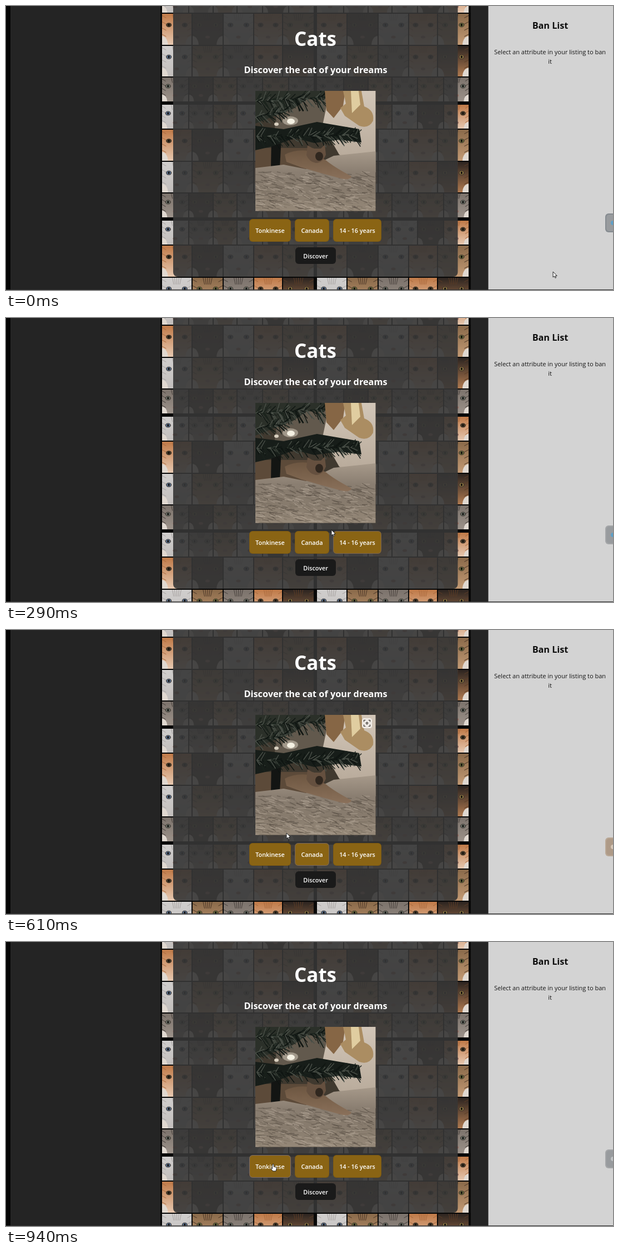
These frames come from a looping animation (1093x512 px, 1010 ms). An HTML page with a canvas:

```html
<!DOCTYPE html>
<html lang="en">
<head>
<meta charset="utf-8">
<title>Cats</title>
<style>
  html, body { margin: 0; width: 100%; height: 100%; overflow: hidden; background: #242424; }
  canvas { display: block; }
</style>
</head>
<body>
<canvas id="stage" width="1093" height="512"></canvas>
<script>
const W = 1093, H = 512, LOOP = 1010;
const stage = document.getElementById('stage').getContext('2d');
const scene = Object.assign(document.createElement('canvas'), { width: W, height: H });
let g = scene.getContext('2d');

let seed = 7;
const random = () => (seed = (seed * 16807) % 2147483647) / 2147483647;

function rect(x, y, w, h, color, radius = 0) {
  g.fillStyle = color;
  g.beginPath();
  g.roundRect(x, y, w, h, radius);
  g.fill();
}
function ellipse(x, y, rx, ry, color) {
  g.fillStyle = color;
  g.beginPath();
  g.ellipse(x, y, rx, ry, 0, 0, 7);
  g.fill();
}
function shape(path, color, outline) {
  const p = new Path2D(path);
  g.fillStyle = color;
  g.fill(p);
  if (outline) { g.strokeStyle = outline; g.lineWidth = 1; g.stroke(p); }
}
function line(x1, y1, x2, y2, color, width = 1) {
  g.strokeStyle = color;
  g.lineWidth = width;
  g.beginPath();
  g.moveTo(x1, y1);
  g.lineTo(x2, y2);
  g.stroke();
}
function text(str, x, y, size, weight, color) {
  g.font = `${weight} ${size}px "Open Sans", "Noto Sans", sans-serif`;
  g.textAlign = 'center';
  g.fillStyle = color;
  g.fillText(str, x, y);
}
function gradient(y1, y2, ...colors) {
  const fill = g.createLinearGradient(0, y1, 0, y2);
  colors.forEach((c, i) => fill.addColorStop(i / (colors.length - 1), c));
  return fill;
}

// Wall of cat faces: top and bottom fur, stripe and eye colours
const FURS = {
  orange: ['#c07a48', '#e6c8b0', '#a8683c', '#4a3a24'],
  brown: ['#40342c', '#4c3c32', '#2c221c', '#6a6038'],
  white: ['#d0cecd', '#c2bebc', '#a5a09e', '#5b7290'],
  tabby: ['#8a6a4a', '#c39a74', '#4a3526', '#6c6c3c'],
  grey: ['#7c736c', '#9c928a', '#453e3a', '#6a7068'],
  calico: ['#2c2420', '#b07a50', '#5c3c26', '#8c7440']
};
const FIVE = [281, 336, 392, 447, 499, 556], SIX = [281, 330, 374, 417, 463, 510, 556];
const ROWS = [
  { y: 14, h: 56, xs: FIVE, cats: ['orange', 'brown', 'white', 'orange', 'tabby'] },
  { y: 72, h: 55, xs: FIVE, cats: ['white', 'tabby', 'grey', 'orange', 'calico'] },
  { y: 129, h: 43, xs: SIX, cats: ['grey', 'brown', 'tabby', 'grey', 'tabby', 'grey'] },
  { y: 178, h: 43, xs: SIX, cats: ['white', 'grey', 'tabby', 'white', 'brown', 'orange'] }
];

function face(x, y, w, h, [top, bottom, stripe, eye]) {
  g.save();
  g.beginPath();
  g.rect(x, y, w, h);
  g.clip();
  rect(x, y, w, h, gradient(y, y + h, top, bottom));
  for (let i = 0; i < 5; i++) {
    const sy = y + h * (i + .3) / 5;
    line(x, sy, x + w * .14, sy + 4, stripe);
    line(x + w, sy, x + w * .86, sy + 4, stripe);
    line(x + w * (.35 + i * .075), y, x + w * (.4 + i * .05), y + h * .22, stripe);
  }
  for (const side of [0, 1]) {
    ellipse(x + side * w, y + h, w * .2, h * .28, '#e0d8d0');
    const ex = x + w * (side ? .77 : .23), ey = y + h * .36;
    ellipse(ex, ey, 5, 4, '#3a322c');
    ellipse(ex, ey, 3.8, 3.2, eye);
    ellipse(ex, ey, 1.7, 2.3, '#141210');
  }
  ellipse(x + w / 2, y + h * .75, 4, 2.5, '#9a6e62');
  g.restore();
}

function wall() {
  rect(278, 0, 559, H, '#080808');
  for (let top = -209; top < H; top += 209)
    for (const { y, h, xs, cats } of ROWS)
      for (const shift of [0, 279])
        cats.forEach((cat, i) =>
          face(xs[i] + shift, top + y, xs[i + 1] - xs[i] - 2, h, FURS[cat]));
}

function needles(x1, y1, x2, y2, count, spread) {
  for (let i = 0; i < count; i++) {
    const k = random(), x = x1 + (x2 - x1) * k, y = y1 + (y2 - y1) * k;
    line(x, y, x + 5 + random() * 11, y + (random() - .4) * spread,
      ['#0e1411', '#1a221c', '#4a5048'][i % 3], 1.4);
  }
}

function photo() {
  g.save();
  g.beginPath();
  g.rect(449, 153, 216.5, 216.5);
  g.clip();
  rect(449, 153, 217, 217, '#40392f');
  shape('M490 172L600 158V235H482Z', '#62594d');
  shape('M583 153H666V300L600 268L570 215Z', gradient(153, 290, '#d2c6b8', '#b5a797'));
  ellipse(512, 207, 14, 8, '#a1988a');
  ellipse(513, 208, 7, 5, '#f4f0e2');
  ellipse(487, 213, 4, 3, '#d8cfbf');
  rect(449, 256, 105, 45, '#5c4a39');
  shape('M478 235H496L493 292H477Z', '#131513');
  // Tree
  shape('M449 153H588L572 170L542 168L516 186L482 199L449 212Z', '#2b3029');
  shape('M449 216L500 222L560 209L636 222L640 246L600 241L555 247L520 238L480 253L449 260Z', '#171d19');
  needles(449, 172, 572, 164, 110, 44);
  needles(449, 200, 500, 190, 40, 34);
  needles(449, 235, 630, 233, 150, 38);
  // Decorations
  shape('M574 153H611L607 180L590 202L577 188Z', '#866645');
  shape('M607 153H640L645 181Q664 188 661 207Q653 222 636 216L610 198L602 184L612 176Z', '#ab8d62');
  shape('M621 153H635L638 178L623 193Z', '#e0cda0');
  // Rug
  shape('M449 292L500 286L540 294L590 270L666 262V370H449Z',
    gradient(265, 369, '#a49788', '#8a7e71', '#877b6d', '#958878'));
  for (let i = 0; i < 420; i++) {
    const x = 440 + random() * 216, y = 298 + random() * 70;
    line(x, y, x + 6 + random() * 10, y + (random() - .2) * 8,
      ['#544a4088', '#b9ac9c77', '#6c615566'][i % 3], 1.5);
  }
  // Cat
  shape('M502 268Q520 258 545 261L576 278Q590 290 622 307Q620 315 603 311L570 302L532 291L505 281Z',
    gradient(258, 312, '#6c5540', '#8a705a'));
  shape('M541 269L543 251L553 257H567L574 250L576 268Q570 283 558 283Q546 281 541 269Z', '#65503f');
  ellipse(564, 271, 7, 8, '#30271f');
  g.restore();
}

const BUTTONS = [
  { label: 'Tonkinese', x: 438, w: 75, enter: 810, leave: LOOP },
  { label: 'Canada', x: 520, w: 62, enter: 500, leave: 610 },
  { label: '14 - 16 years', x: 589, w: 87, enter: 200, leave: 290 }
];

function drawScene() {
  rect(0, 0, W, H, '#242424');
  rect(0, 0, 8, H, '#050505');
  wall();
  rect(301, 0, 512.5, 488, 'rgba(54,54,54,.9)', [0, 0, 8, 8]);
  text('Cats', 557, 72, 35, 700, '#fff');
  text('Discover the cat of your dreams', 557.5, 121, 16.3, 700, '#fff');
  photo();
  for (const b of BUTTONS) {
    rect(b.x, 384, b.w, 41, '#7f5b11', 6);
    rect(b.x + 1, 385, b.w - 2, 39, '#8a6414', 5);
    text(b.label, b.x + b.w / 2, 409, 10.8, 600, '#fff');
  }
  rect(521, 435, 73, 30, '#1a1a1a', 6);
  text('Discover', 557.5, 455, 10.8, 600, '#fff');
  rect(868.5, 0, 225, H, '#d3d3d3');
  text('Ban List', 980, 41, 16.2, 700, '#0c0c0c');
  text('Select an attribute in your listing to ban', 979.5, 87, 11, 400, '#151515');
  text('it', 979.5, 104, 11, 400, '#151515');
  rect(0, 511, W, 1, '#303030');
}

// Pointer samples: start time, tip x, tip y, hand instead of arrow
const POINTER = [
  [0, 985, 479, 0], [70, 885, 455, 0], [140, 715, 412, 0], [200, 611, 391, 1],
  [290, 586, 382, 0], [350, 575, 382, 0], [420, 565, 386, 1], [500, 560, 388, 1],
  [550, 546, 386, 1], [610, 505, 366, 0], [680, 474, 380, 0], [740, 476, 386, 1],
  [810, 478, 390, 1], [880, 480, 396, 1], [940, 481, 400, 1]
];
const ARROW = 'M0 0V10L2.4 8L4 11.4L5.6 10.7L4.1 7.4H7.2Z';
const HAND = 'M-1.2 1Q0 -.6 1.2 1V5L5 6Q6.3 6.4 6.2 8L5 13H-.5L-4 8.5Q-4 6.8 -1.2 8.5Z';

function lensIcon() {
  rect(641, 159, 18, 18, '#eee9e4', 4);
  g.strokeStyle = '#3a3530';
  g.lineWidth = 1.2;
  for (const sx of [-1, 1]) for (const sy of [-1, 1]) {
    g.beginPath();
    g.moveTo(650 + sx * 2.5, 168 + sy * 5.5);
    g.lineTo(650 + sx * 5.5, 168 + sy * 5.5);
    g.lineTo(650 + sx * 5.5, 168 + sy * 2.5);
    g.stroke();
  }
  g.beginPath();
  g.arc(650, 168, 1.6, 0, 7);
  g.stroke();
}

function sideTab(t) {
  const brown = t >= 610 && t < 740;
  rect(1079, 374, 20, 34, brown ? '#b9a795' : t < 70 ? '#858b90' : '#a3a5a7', 6);
  rect(1081, 376, 18, 30, brown ? '#ae9a87' : '#989b9e', 5);
  ellipse(1093, 391, 4, 4, brown ? '#d5c7b8' : t < 610 ? '#5fa0c8' : '#bfc2c4');
}

drawScene();
g = stage;

function frame(now) {
  const time = now % LOOP;
  const [t, x, y, hand] = POINTER.findLast(p => p[0] <= time);
  g.drawImage(scene, 0, 0);
  sideTab(t);
  for (const b of BUTTONS) {
    const glow = (t < b.leave ? t - b.enter : 2 * b.leave - b.enter - t) / 250;
    if (glow <= 0) continue;
    g.globalAlpha = Math.min(glow, 1);
    g.strokeStyle = '#7479c0';
    g.lineWidth = 1;
    g.beginPath();
    g.roundRect(b.x + .5, 384.5, b.w - 1, 40, 6);
    g.stroke();
    g.globalAlpha = 1;
  }
  if (t >= 610 && t < 740) lensIcon();
  g.save();
  g.translate(x, y);
  shape(hand ? HAND : ARROW, '#fff', '#222');
  g.restore();
  requestAnimationFrame(frame);
}
requestAnimationFrame(frame);
</script>
</body>
</html>
```
